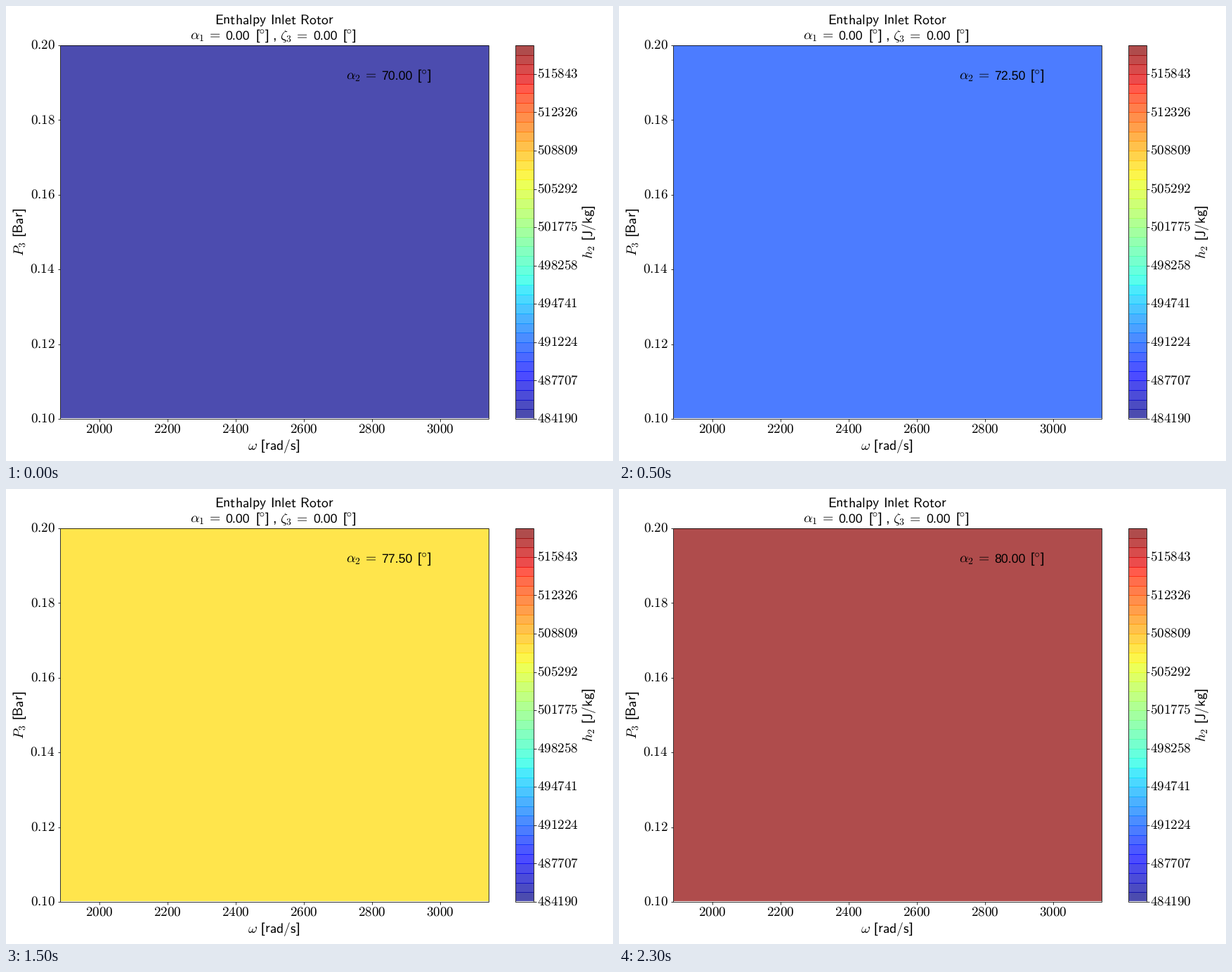
Write a matplotlib script that moves like this. It is 864 by 648 pixels and loops after 2.5 s.

```python
import math

import matplotlib
import matplotlib.pyplot as plt
from matplotlib.animation import FuncAnimation
from matplotlib.patches import Circle, Rectangle

W, H, DPI = 864, 648, 72
LEFT, RIGHT, TOP, BOTTOM = 77, 687, 56, 588
BAR_LEFT, BAR_RIGHT = 725, 751
BANDS = 39
ALPHA = 0.7
SIZE, TICK_SIZE, DIGIT_SIZE = 19.7, 19.2, 17.8
LINE = 0.8
SP = r"\hspace{0.38}"

ANGLES = [70 + 2.5 * i for i in range(5)]
BAND_AT = [0, 7, 15, 26, 38]  # colour band of the uniform enthalpy field

matplotlib.rcParams["font.family"] = "Liberation Sans"
matplotlib.rcParams["mathtext.fontset"] = "cm"
matplotlib.rcParams["text.hinting"] = "none"

fig = plt.figure(figsize=(W / DPI, H / DPI), dpi=DPI, facecolor="white")
ax = fig.add_axes([0, 0, 1, 1])
ax.set(xlim=(0, W), ylim=(H, 0))
ax.axis("off")


def sans(s):
    return r"$\mathsf{" + s.replace(" ", SP) + "}$"


def axis_name(symbol, unit):
    return f"${symbol}{SP}$[{sans(unit)}]"


def label(x, y, s, size=SIZE, **kw):
    kw.setdefault("va", "baseline")
    return ax.text(x, y, s, fontsize=size, color="black", zorder=5, **kw)


def tick_label(x, y, s, **kw):
    label(x, y, rf"$\mathrm{{{s}}}$", TICK_SIZE, **kw)


def line(xs, ys):
    ax.plot(xs, ys, color="black", lw=LINE, solid_capstyle="butt", zorder=4)


def frame(x0, x1):
    ax.add_patch(Rectangle((x0, TOP), x1 - x0, BOTTOM - TOP, fill=False,
                           ec="black", lw=LINE, zorder=4))


def band_color(k):
    return matplotlib.colormaps["jet"]((k + 0.5) / BANDS)


def angle(x, y, symbol, value):
    """Write 'symbol = value [deg]' and return the text of the value."""
    head = label(x, y, rf"${symbol}\hspace{{0.18}}=$")
    x = head.get_window_extent().x1 + 6.8
    digits = f"{value:.2f}"
    text = label(x, y, digits, DIGIT_SIZE)
    x += (0.5 * (len(digits) - 1) + 0.278) * SIZE
    label(x + 7.3, y, "[")
    ax.add_patch(Circle((x + 16.5, y - 11.3), 2.6, fill=False, ec="black",
                        lw=0.7, zorder=5))
    label(x + 21.3, y, "]")
    return text


# Plot area
field = ax.add_patch(Rectangle((78, 56), 609, 531, lw=0, alpha=ALPHA, zorder=1))
frame(LEFT, RIGHT)

W_MIN, W_MAX = 600 * math.pi, 1000 * math.pi
for speed in range(2000, 3001, 200):
    x = LEFT + (speed - W_MIN) / (W_MAX - W_MIN) * (RIGHT - LEFT)
    line([x, x], [BOTTOM, BOTTOM + 3.5])
    tick_label(x, 608.5, speed, ha="center")

for i in range(6):
    y = BOTTOM - i * (BOTTOM - TOP) / 5
    line([LEFT - 3.5, LEFT], [y, y])
    tick_label(70, y + 5.7, f"{0.1 + 0.02 * i:.2f}", ha="right")

# Colour bar: neighbouring bands share one pixel row, which shows as a thin line
step = (BOTTOM - TOP) / BANDS
for k in range(BANDS):
    y0 = round(BOTTOM - (k + 1) * step)
    y1 = min(round(BOTTOM - k * step) + 1, BOTTOM - 1)
    ax.add_patch(Rectangle((726, y0), 25, y1 - y0, fc=band_color(k), lw=0,
                           alpha=ALPHA, zorder=1))
frame(BAR_LEFT, BAR_RIGHT)

for i in range(10):
    y = BOTTOM - 4 * i * step
    line([BAR_RIGHT, BAR_RIGHT + 3.5], [y, y])
    tick_label(756.5, y + 5.7, 484190 + 3517 * i)

# Titles and axis names
label(381.5, 25.5, sans("Enthalpy Inlet Rotor"), ha="center")
angle(262.5, 47.5, r"\alpha_1", 0)
label(379, 47.5, ",")
angle(390.5, 47.5, r"\zeta_3", 0)

label(381.5, 632.5, axis_name(r"\omega", "rad/s"), ha="center")
label(8.5, 322, axis_name("P_3", "Bar"), rotation=90, va="center")
label(818.5, 321.5, axis_name("h_2", "J/kg"), rotation=90, va="center")

readout = angle(483.5, 105, r"\alpha_2", ANGLES[0])


def update(i):
    field.set_facecolor(band_color(BAND_AT[i]))
    readout.set_text(f"{ANGLES[i]:.2f}")
    return field, readout


anim = FuncAnimation(fig, update, frames=len(ANGLES), interval=500,
                     repeat=True, repeat_delay=0, blit=False)
plt.show()
```
